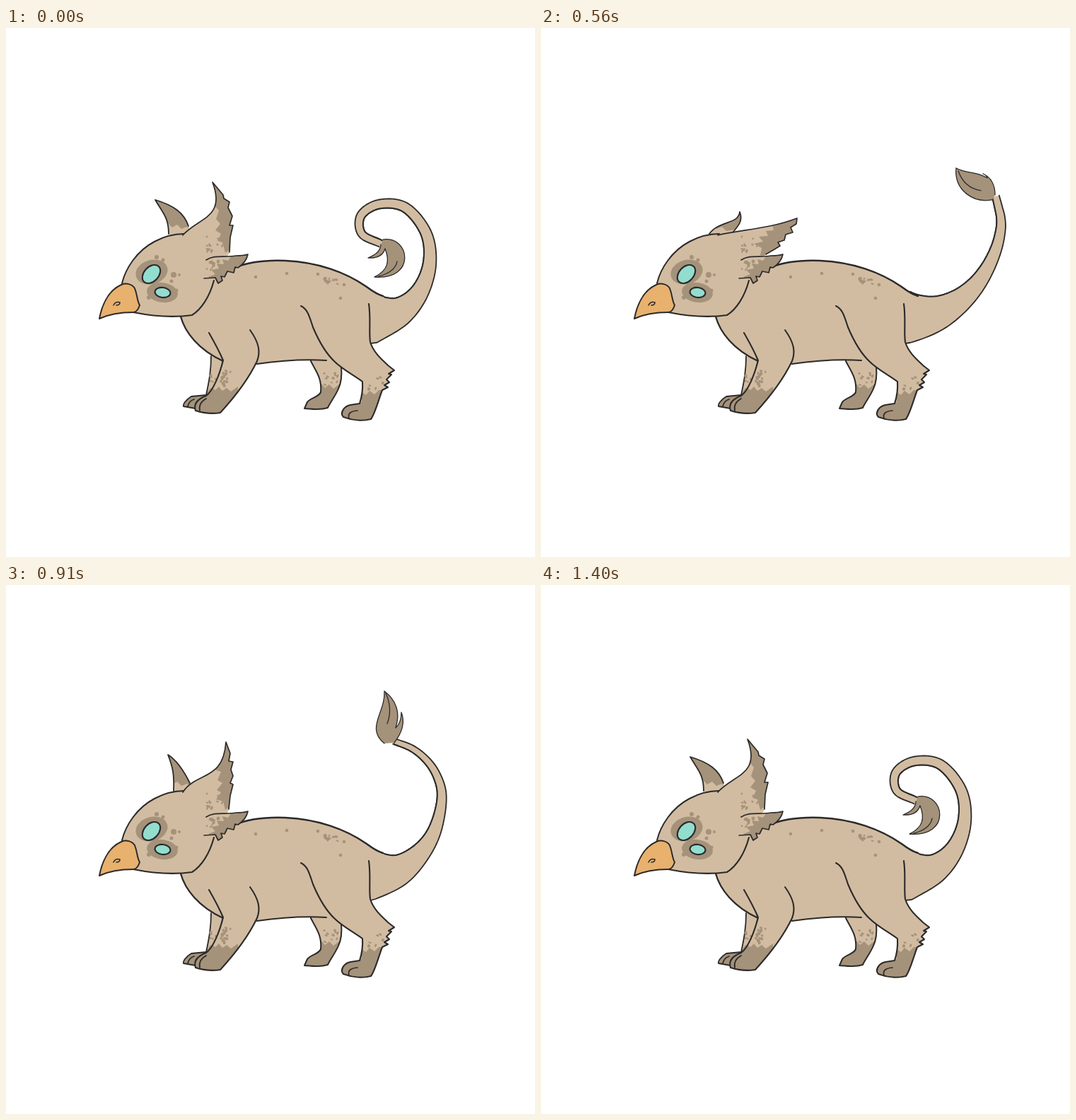
Recreate the animation shown at these times as an HTML page with a canvas. Size 748 px wide and 748 px high, loop 1470 ms.

```html
<!DOCTYPE html>
<html lang="en">
<head>
<meta charset="utf-8">
<title>Beaked creature swishing its tail</title>
<style>
html, body { margin: 0; height: 100%; overflow: hidden; background: #fff; }
canvas { display: block; }
</style>
</head>
<body>
<canvas id="stage" width="748" height="748"></canvas>
<script>
const ctx = document.getElementById('stage').getContext('2d');
const TAN = '#d2bca1', DARK = '#a5927a', LINE = '#2b2a2a', EYE = '#93ddcf', BEAK = '#e8b16d';
const LOOP = 1470, STEP = 70;
const NUM = /-?\d+(\.\d+)?/g;

const lerp = (a, b, t) => a + (b - a) * t;

// Blends two path strings that share the same commands.
function blend(a, b, t) {
  const to = b.match(NUM);
  let i = 0;
  return a.replace(NUM, n => lerp(+n, +to[i++], t).toFixed(2));
}

// Finds the neighbouring keys for a time, as [before, after, fraction].
function between(keys, time) {
  const i = Math.max(1, keys.findIndex(k => k.t >= time));
  const a = keys[i - 1], b = keys[i];
  return [a, b, (time - a.t) / (b.t - a.t)];
}

function fill(d, color) {
  ctx.fillStyle = color;
  ctx.fill(new Path2D(d));
}

function stroke(d, width = 2) {
  ctx.strokeStyle = LINE;
  ctx.lineWidth = width;
  ctx.stroke(new Path2D(d));
}

function patch(outline, d, color = DARK) {
  ctx.save();
  ctx.clip(new Path2D(outline));
  fill(d, color);
  ctx.restore();
}

function oval(x, y, rx, ry, angle, color) {
  ctx.beginPath();
  ctx.ellipse(x, y, rx, ry, angle, 0, 7);
  ctx.fillStyle = color;
  ctx.fill();
}

function speckle(x, y, w, h, count, seed) {
  const random = () => (seed = seed * 16807 % 2147483647) / 2147483647;
  for (let i = 0; i < count; i++) {
    oval(x + w * random(), y + h * random(), 1 + 1.5 * random(), 1 + 1.8 * random(), 0.4, DARK);
  }
}

// ---- Tail ----
// Moves a tuft path to its own frame: root at 0,0 and pointing along +x.
function local(d, x, y, degrees) {
  const c = Math.cos(degrees * Math.PI / 180), s = Math.sin(degrees * Math.PI / 180);
  return d.replace(/(\d+) (\d+)/g, (_, px, py) =>
    ((px - x) * c + (py - y) * s).toFixed(1) + ' ' + ((py - y) * c - (px - x) * s).toFixed(1));
}

// Each tuft is an outline followed by one inner hair line.
const tufts = {
  hook: local('M533 299C571 293 581 357 521 352C540 343 543 330 536 312Q532 326 512 325Q530 318 530 306M527 351Q550 345 553 330', 530, 305, 104),
  hang: local('M497 222C488 240 508 270 486 296C468 278 467 262 471 247Q460 250 463 266Q452 238 490 218M486 292Q494 270 488 255', 494, 219, 95),
  leaf: local('M638 243C612 248 584 230 587 198C600 206 615 202 631 212Q630 208 625 206Q642 214 642 236M590 202Q598 226 622 230', 643, 238, 218),
  bud: local('M621 257C608 225 625 205 658 194C664 215 656 226 654 236Q656 236 657 235Q650 255 634 261M656 197Q640 215 637 235', 629, 260, 294),
  flame: local('M535 224C508 202 537 180 535 150C552 163 558 180 551 202Q559 195 559 180Q567 200 549 223M537 153Q547 175 539 196', 549, 221, 262),
  brush: local('M509 301C532 318 540 342 514 361C517 345 503 335 500 318Q496 327 485 326Q496 318 497 300M518 357Q528 335 512 315', 504, 300, 77)
};

// Centre lines from the rump to the tuft.
const spines = {
  curl: '558 400 585 373 599 333 594 290 565 254 528 249 502 265 503 291 530 305',
  loop: '558 402 588 377 604 337 604 297 586 262 549 246 516 254 500 277 504 300',
  open: '558 401 588 374 606 334 608 293 591 258 562 240 531 235 506 244 494 264',
  arch: '557 402 590 373 611 333 616 294 604 260 581 236 553 221 523 216 494 219',
  rise: '557 403 589 381 614 350 628 318 632 285 625 256 610 235 588 221 562 217',
  back: '557 404 587 389 612 367 631 340 644 311 650 285 650 268 647 254 643 238',
  tall: '555 404 582 388 603 365 619 339 629 314 633 297 634 285 632 272 629 260',
  bow: '555 403 582 383 602 356 613 324 616 293 608 267 594 247 574 231 549 221'
};

const tailKey = (t, spine, tuft, angle, tip, taper) =>
  ({ t, spine: spines[spine], tuft: tufts[tuft], angle, tip, taper });
const tailKeys = [
  tailKey(0, 'curl', 'hook', 104, 5, 7),
  tailKey(175, 'open', 'hang', 85, 5, 6),
  tailKey(350, 'arch', 'hang', 95, 3.6, 5.5),
  tailKey(455, 'rise', 'hang', 160, 4, 5),
  tailKey(560, 'back', 'leaf', 218, 5, 4),
  tailKey(630, 'back', 'leaf', 275, 5, 4),
  tailKey(700, 'back', 'bud', 320, 5, 4),
  tailKey(770, 'tall', 'bud', 294, 5, 4),
  tailKey(910, 'bow', 'flame', 262, 4, 5),
  tailKey(1050, 'open', 'flame', 165, 4.5, 6),
  tailKey(1190, 'loop', 'brush', 77, 6, 7),
  tailKey(1400, 'curl', 'hook', 104, 5, 7),
  tailKey(1470, 'curl', 'hook', 104, 5, 7)
];

function spline(points, u) {
  const last = points.length - 3;
  const i = Math.min(last - 1, Math.max(0, Math.floor(u * last))), f = u * last - i;
  return [0, 1].map(axis => {
    const [a, b, c, d] = points.slice(i, i + 4).map(p => p[axis]);
    return b + f * (c - a + f * (2 * a - 5 * b + 4 * c - d + f * (3 * (b - c) + d - a))) / 2;
  });
}

function drawTail(time) {
  const [a, b, f] = between(tailKeys, time);
  const mix = name => lerp(a[name], b[name], f);
  const flat = blend(a.spine, b.spine, f).split(' ').map(Number);
  const points = [[492, 404], [522, 409]];
  for (let i = 0; i < flat.length; i += 2) points.push([flat[i], flat[i + 1]]);
  const [before, end] = points.slice(-2);
  points.push([2 * end[0] - before[0], 2 * end[1] - before[1]]);

  const outer = [[515, 446]], inner = [];
  for (let i = 0; i <= 72; i++) {
    const u = i / 72, [x, y] = spline(points, u);
    const [x0, y0] = spline(points, u - 0.004), [x1, y1] = spline(points, u + 0.004);
    const half = mix('tip') + 4 * (1 - u) + 27 * (1 - u) ** mix('taper');
    const k = half / Math.hypot(x1 - x0, y1 - y0);
    const nx = (y0 - y1) * k, ny = (x1 - x0) * k;
    outer.push([x + nx, y + ny]);
    inner.push([x - nx, y - ny]);
  }
  stroke('M' + inner.join('L'), 2);
  fill('M' + [...outer, ...inner.reverse()].join('L') + 'Z', TAN);
  stroke('M' + outer.join('L'), 1.8);
  stroke('M' + inner.join('L'), 2);

  ctx.save();
  ctx.translate(...end);
  ctx.rotate(mix('angle') * Math.PI / 180);
  const tuft = blend(a.tuft, b.tuft, f);
  fill(tuft.slice(0, tuft.lastIndexOf('M')), DARK);
  stroke(tuft, 1.3);
  ctx.restore();
}

// ---- Ears ----
const ears = {
  up: {
    far: 'M230 291C230 268 222 262 211 243C238 251 252 262 258 280',
    near: 'M250 293C272 268 311 269 292 218L307 236L308 241L316 246L314 254L320 266L316 279L321 279L317 296L316 317',
    dark: 'M286 214L294 250L301 258L297 270L303 277L296 286L304 291L299 301L306 303L310 318L335 300L325 230Z'
  },
  tilt: {
    far: 'M237 291C238 268 236 258 229 240C242 248 252 264 260 280',
    near: 'M250 293C270 263 307 278 311 222L317 238L315 249L321 250L318 261L321 270L317 280L321 282L317 298L315 317',
    dark: 'M305 214L297 262L304 264L299 276L306 280L298 290L304 293L297 303L307 306L310 318L335 300L325 230Z'
  },
  flat: {
    far: 'M238 291C252 272 279 278 281 260C286 272 279 280 272 288',
    near: 'M250 293C280 285 320 285 362 269L361 277L353 282L356 289L346 292L344 300L335 303L338 308L330 313L318 320',
    dark: 'M350 262L327 278L329 286L318 287L321 294L308 295L314 302L301 305L312 311L310 322L345 320L375 270Z'
  },
  half: {
    far: 'M245 290C249 272 260 268 263 245C271 260 269 270 270 283',
    near: 'M250 293C278 278 305 280 350 258L343 270L331 277L332 283L324 285L325 291L319 293L321 299L317 304L316 317',
    dark: 'M340 255L305 274L310 281L300 286L308 290L298 296L306 299L296 304L308 308L312 318L330 310L360 265Z'
  }
};
const earKeys = [[0, 'up'], [350, 'tilt'], [560, 'flat'], [630, 'flat'], [770, 'half'], [910, 'tilt'], [1120, 'up'], [1470, 'up']]
  .map(([t, pose]) => ({ t, ...ears[pose] }));

function drawFarEar(d) {
  const shape = d + 'L260 294L235 294Z';
  fill(shape, DARK);
  patch(shape, 'M222 281l8 -4l5 5l7 -4l6 6l8 -3l6 6l12 -2v14h-52Z', TAN);
  stroke(d, 1.8);
}

function drawNearEar(d, dark) {
  const shape = d + 'L312 325L285 332Z';
  fill(shape, TAN);
  patch(shape, dark);
  speckle(284, 292, 22, 24, 11, 77);
  stroke(d, 1.7);
}

// ---- Body ----
const BACK = 'M323 339C345 330 370 328 395 329C440 331 480 345 510 366C518 372 526 377 533 379';
const CHEST = 'M247 408C253 430 272 455 307 471';
const FAR_HIND = 'M431 460L431 471C438 485 447 495 445 515C442 522 430 523 426 529L422 538C435 539 445 540 455 537C458 530 466 520 470 510C475 500 475 490 474 478L470 460';
const FAR_FRONT = 'M290 464C290 485 287 500 283 519L262 521C254 526 250 532 251 535L268 538';
const NEAR_FRONT = 'M345 427C358 445 360 458 355 471C345 492 325 520 303 544C290 546 280 545 268 541C265 532 270 525 283 520C293 513 302 490 307 470C302 458 295 445 287 431';
const NEAR_HIND = 'M513 390C516 410 513 430 515 444C520 460 533 470 540 477L549 484L541 489L545 490L538 497L542 501L535 505L540 508L532 512C527 525 522 545 516 553C505 556 490 555 477 550C472 545 477 535 487 533L500 531C502 525 505 515 504 500C490 490 475 482 465 472C452 460 442 442 434 423C429 408 427 398 417 393';

function drawLeg(outline, dark, width) {
  fill(outline, TAN);
  patch(outline, dark);
  stroke(outline, width);
}

function drawBody() {
  drawLeg(FAR_HIND, 'M415 512l25 -2l6 -7l5 6l6 -5l6 6l8 -6l9 3v40h-65Z', 2);
  speckle(450, 487, 20, 18, 11, 31);
  drawLeg(FAR_FRONT + 'L290 538L307 470', 'M245 515l40 0l4 -6l5 4l12 -5v40h-61Z', 1.8);
  speckle(289, 490, 8, 16, 5, 12);
  fill(BACK + 'L545 400L540 425L515 446L470 474L453 470C420 468 390 470 355 475L307 471C272 455 253 430 247 408L263 405L294 356Z', TAN);
  stroke(BACK, 2.6);
  stroke(CHEST, 2.3);
  stroke('M355 475C390 470 420 468 453 470', 2);
  drawLeg(NEAR_FRONT, 'M262 521l25 -3l3 -11l6 5l5 -5l5 6l6 -4l6 5l10 -7v42h-66Z', 2.1);
  stroke('M274 541Q272 530 283 524M257 535Q259 527 266 525', 1.8);
  speckle(304, 484, 20, 24, 15, 5);
  drawLeg(NEAR_HIND, 'M470 533l33 -4v-14l6 4l5 -6l7 5l6 -6l12 0v46h-69Z', 2.1);
  stroke('M485 552Q482 542 497 541', 1.7);
  speckle(513, 493, 20, 18, 6, 91);
  for (const [x, y] of [[353, 352], [397, 347], [441, 348], [473, 382], [478, 363]]) oval(x, y, 2.3, 2.3, 0, DARK);
  speckle(450, 354, 19, 9, 14, 8);
}

// ---- Head ----
const BROW = 'M164 361C169 340 185 315 210 302C225 294 240 291 252 291';
const BEAK_SHAPE = 'M163 363C170 360 178 362 182 368C186 378 185 385 189 392C187 398 184 402 180 402C160 402 145 405 132 411C135 395 143 372 163 363Z';
const CHEEK = 'M283 328C295 320 310 325 325 322Q336 322 342 320C340 330 334 335 328 339L324 338L322 346L313 344L309 352L304 351L306 357L300 361L296 353L280 354';

function drawEye(x, y, rx, ry, angle, open) {
  ctx.save();
  ctx.translate(x, y);
  ctx.scale(1, open);
  oval(0, 0, rx, ry, angle, EYE);
  ctx.restore();
  ctx.strokeStyle = LINE;
  ctx.lineWidth = 2.1;
  ctx.stroke();
}

function drawHead(ear, open) {
  fill(BROW + 'L285 325L310 340L294 357C288 380 276 398 263 406C235 410 205 407 180 402Z', TAN);
  oval(206, 345, 23, 17, -0.3, DARK);
  oval(221, 374, 22, 14, 0.15, DARK);
  for (const [x, y, r] of [[213, 324, 3], [222, 328, 2.5], [237, 349, 4], [245, 349, 2], [234, 358, 2.5], [241, 371, 2.5], [188, 342, 3], [202, 381, 3]]) {
    oval(x, y, r, r, 0, DARK);
  }
  drawEye(205.5, 348, 10.3, 15, 0.75, open);
  drawEye(221.5, 374, 11, 7, 0.12, open);
  stroke(BROW, 2);
  stroke('M180 402C205 407 235 410 263 406C276 398 288 380 294 357', 2.1);
  fill(BEAK_SHAPE, BEAK);
  stroke(BEAK_SHAPE, 2);
  stroke('M152 392Q155 386 161 388Q161 392 156 392', 1.6);
  drawNearEar(ear.near, ear.dark);
  fill(CHEEK, TAN);
  patch(CHEEK, 'M345 316L318 323L314 329L306 327L308 334L298 333L301 340L290 342L296 348L286 352L300 365L345 345Z');
  speckle(284, 328, 18, 16, 8, 44);
  stroke(CHEEK, 1.7);
}

function draw(time) {
  const [a, b, f] = between(earKeys, time);
  const ear = {};
  for (const part of ['far', 'near', 'dark']) ear[part] = blend(a[part], b[part], f);
  const open = time === 1260 ? 0.5 : time === 1330 ? 0.1 : 1;

  ctx.fillStyle = '#fff';
  ctx.fillRect(0, 0, 748, 748);
  drawTail(time);
  drawFarEar(ear.far);
  drawBody();
  drawHead(ear, open);
}

ctx.lineCap = ctx.lineJoin = 'round';
function tick() {
  draw(Math.floor(performance.now() % LOOP / STEP) * STEP);
  requestAnimationFrame(tick);
}
tick();
</script>
</body>
</html>
```
